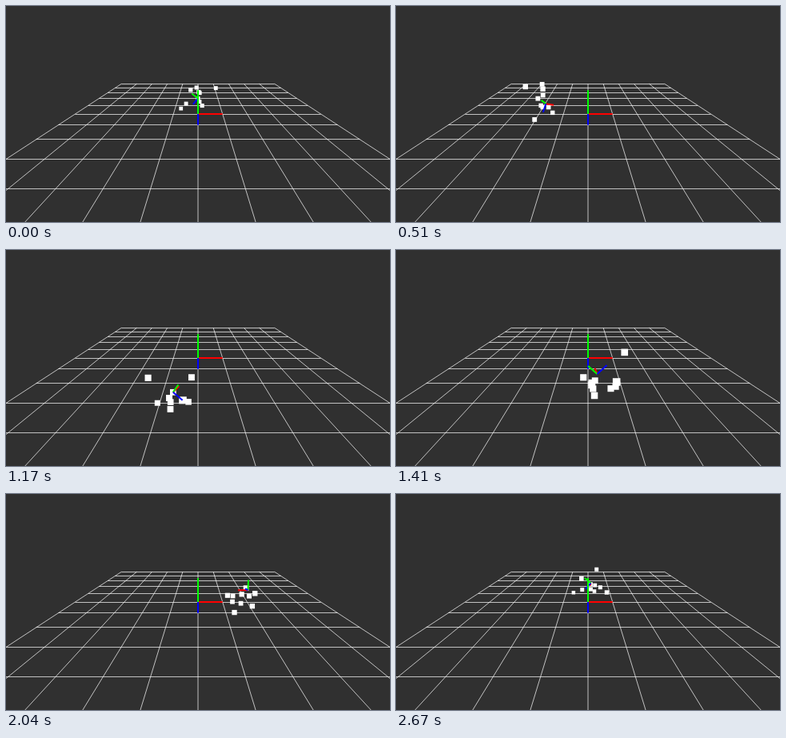
These frames come from a looping animation (480x270 px, 2700 ms). An HTML page with a canvas:

```html
<!DOCTYPE html>
<html lang="en">
<head>
<meta charset="utf-8">
<title>Orbiting swarm</title>
<style>
  html, body { margin: 0; width: 100%; height: 100%; overflow: hidden; background: #303030; }
  canvas { display: block; }
</style>
</head>
<body>
<canvas id="stage" width="480" height="270"></canvas>
<script>
const ctx = document.getElementById('stage').getContext('2d');
const W = 480, H = 270, LOOP = 2700, STEP = 30;
const COUNT = 10, LIFE = LOOP / 3, SPREAD = 1;

// Camera at (0, 3, 7) looking at the origin, 60 degree field of view.
const FOCAL = H / 2 / Math.tan(Math.PI / 6);
const DIST = Math.hypot(3, 7), SIN = 3 / DIST, COS = 7 / DIST;
const AXIS_COLORS = ['#f00', '#0f0', '#00f'];
const GRID_COLOR = 'rgba(255, 255, 255, 0.7)';

function project([x, y, z]) {
  const depth = DIST - y * SIN - z * COS;
  const scale = FOCAL / depth;
  return { x: W / 2 + x * scale, y: H / 2 - (y * COS - z * SIN) * scale, depth };
}

function line(from, to, color, width) {
  ctx.strokeStyle = color;
  ctx.lineWidth = width;
  ctx.beginPath();
  ctx.moveTo(from.x, from.y);
  ctx.lineTo(to.x, to.y);
  ctx.stroke();
}

function drawGrid() {
  for (let i = -5; i <= 5; i++) {
    line(project([i, 0, -5]), project([i, 0, 5]), GRID_COLOR, 1);
    const left = project([-5, 0, i]), right = project([5, 0, i]);
    left.y = right.y = Math.floor(left.y) + 0.5;
    line(left, right, GRID_COLOR, 1);
  }
}

function drawAxes(origin, dirs, length) {
  const start = project(origin);
  dirs.forEach((dir, k) => {
    const end = project(origin.map((v, i) => v + dir[i] * length));
    line(start, end, AXIS_COLORS[k], 2);
  });
}

function unit(v) {
  const n = Math.hypot(...v);
  return v.map(c => c / n);
}

function cross(a, b) {
  return [a[1] * b[2] - a[2] * b[1], a[2] * b[0] - a[0] * b[2], a[0] * b[1] - a[1] * b[0]];
}

function headAt(angle) {
  return [-2 * Math.sin(angle), -0.5 * Math.sin(5 * angle), -2 * Math.cos(angle)];
}

// Right, up and forward directions of the head, facing along its path.
function headingAt(angle) {
  const forward = unit([-2 * Math.cos(angle), -2.5 * Math.cos(5 * angle), 2 * Math.sin(angle)]);
  const right = unit(cross([0, 1, 0], forward));
  return [right, cross(forward, right), forward];
}

function random(seed) {
  const s = Math.sin(seed * 12.9898) * 43758.5453;
  return s - Math.floor(s);
}

// Each particle leaves the head in a random direction, slows down and is reborn.
function drawParticles(time, head) {
  ctx.fillStyle = '#fff';
  for (let i = 0; i < COUNT; i++) {
    const life = time / LIFE + i / COUNT;
    const birth = Math.floor(life) * COUNT + i + 1;
    const reach = SPREAD * Math.sqrt(life % 1);
    const p = project(head.map((v, k) => v + reach * (2 * random(birth * 3 + k) - 1)));
    const size = 47 / p.depth;
    ctx.fillRect(p.x - size / 2, p.y - size / 2, size, size);
  }
}

function draw(now) {
  const time = Math.floor(now % LOOP / STEP) * STEP;
  const angle = time / LOOP * 2 * Math.PI;
  const head = headAt(angle);
  const worldAxes = () => drawAxes([0, 0, 0], [[1, 0, 0], [0, 1, 0], [0, 0, 1]], 1);
  const swarm = () => {
    drawParticles(time, head);
    drawAxes(head, headingAt(angle), 0.4);
  };
  const layers = head[2] > 0 ? [worldAxes, swarm] : [swarm, worldAxes];

  ctx.fillStyle = '#303030';
  ctx.fillRect(0, 0, W, H);
  drawGrid();
  layers.forEach(layer => layer());
  requestAnimationFrame(draw);
}

draw(0);
</script>
</body>
</html>
```
